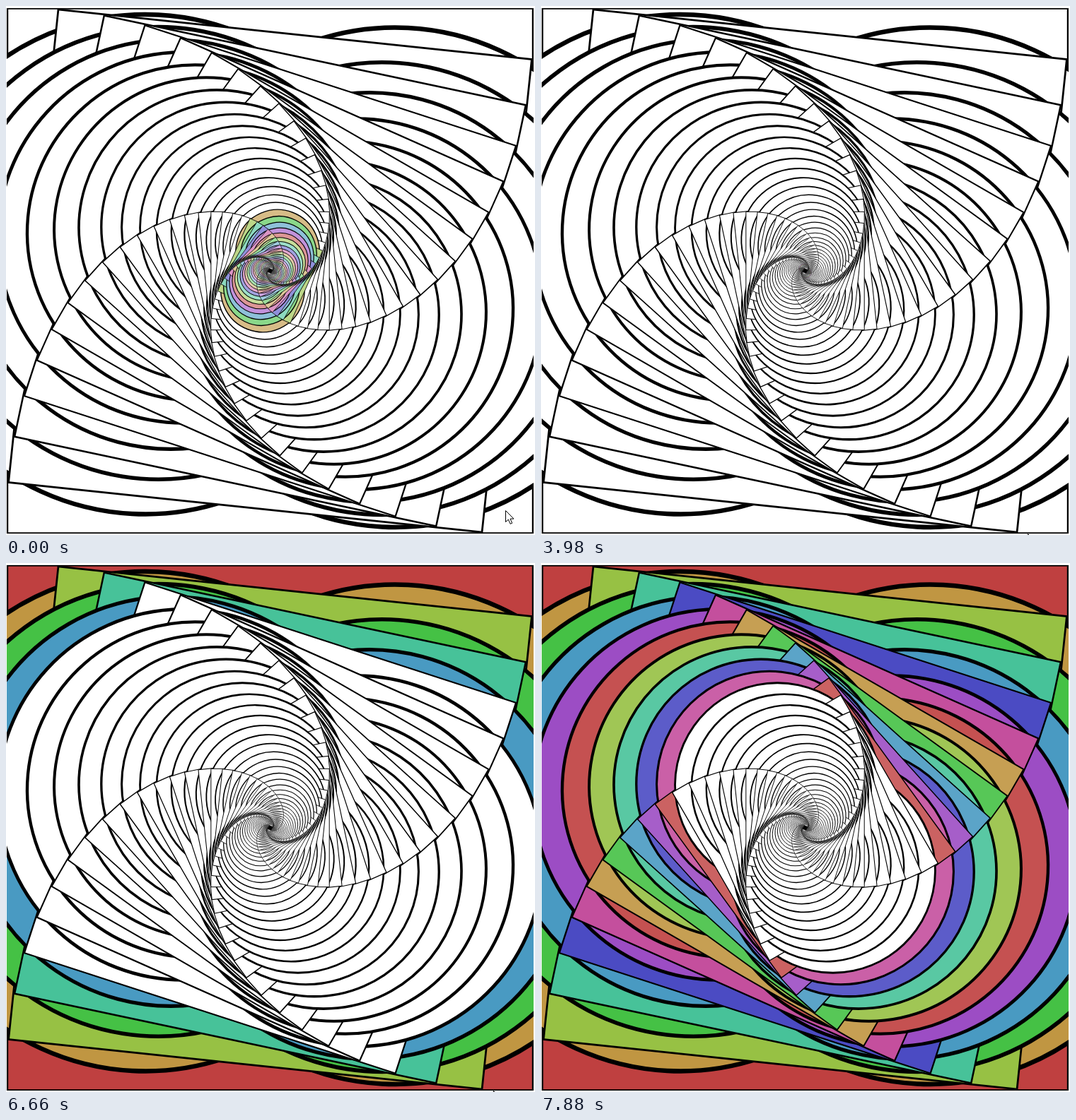
An HTML page with a canvas for the animation above (8000 ms loop, 748 by 749 pixels).

```html
<!DOCTYPE html>
<html lang="en">
<head>
<meta charset="utf-8">
<title>Spiral nest</title>
<style>
  html, body { margin: 0; width: 100%; height: 100%; overflow: hidden; background: #fff; }
  canvas { display: block; }
</style>
</head>
<body>
<canvas id="stage" width="748" height="749"></canvas>
<script>
const ctx = document.getElementById('stage').getContext('2d');
const LOOP = 8000, TICK = LOOP / 60;
const CX = 373.5, CY = 375, SIZE = 743.5;
const COUNT = 98;
const TURN = 3 * Math.PI / 180;
// Each figure fits the square around it after a turn.
const SHRINK = 1 / (Math.cos(TURN) + Math.sin(TURN));
const WIPE_START = -3473, WIPE_STEP = 95;
const PAINT_START = 6103, PAINT_STEP = 97;
const ARROW = new Path2D('M0 0V16L3.8 12.6 6.6 18.8 9.2 17.7 6.5 11.6H11.5Z');

const clamp = v => Math.max(0, Math.min(1, v));

function paint(path, fill, width) {
  ctx.fillStyle = fill;
  ctx.strokeStyle = '#000';
  ctx.lineWidth = width;
  ctx.fill(path);
  ctx.stroke(path);
}

// Even figures are squares, odd ones are pairs of overlapping circles.
function figure(i, fill) {
  const scale = SHRINK ** i, size = SIZE * scale;
  ctx.save();
  ctx.translate(CX, CY);
  ctx.rotate(TURN * i);
  if (i % 2) {
    for (const side of [-1, 1]) {
      const disc = new Path2D();
      disc.arc(side * size / 4, 0, size / 2, 0, 2 * Math.PI);
      paint(disc, fill, 6.2 * scale + 0.4);
    }
  } else {
    const box = new Path2D();
    box.rect(-size / 2, -size / 2, size, size);
    paint(box, fill, 2.6 * scale + 0.4);
  }
  ctx.restore();
}

// Colours are wiped from the outside in, then painted back the same way.
function fillOf(i, t) {
  const coloured = t >= PAINT_START
    ? i <= (t - PAINT_START) / PAINT_STEP
    : i > (t - WIPE_START) / WIPE_STEP;
  return coloured ? `hsl(${i * 40 % 360}, 50%, ${50 + i / 2}%)` : '#fff';
}

// The pointer drifts up, leaves at the bottom, later peeks in at the edge.
function pointer(t) {
  let x = 706, y = 714 - 9 * clamp(t / 900);
  if (t > 1100) y = 725;
  if (t > 1300) {
    if (t < 2700 || t > 7550) return;
    x = 686 + 3 * clamp((t - 2700) / 1800);
    y = 747;
  }
  ctx.save();
  ctx.translate(Math.round(x) + 0.5, Math.round(y) + 0.5);
  paint(ARROW, '#fff', 1);
  ctx.restore();
}

function draw(t) {
  ctx.fillStyle = '#fff';
  ctx.fillRect(0, 0, 748, 749);
  ctx.save();
  ctx.beginPath();
  ctx.rect(1, 3, 745, 744);
  ctx.clip();
  for (let i = 0; i < COUNT; i++) figure(i, fillOf(i, t));
  figure(COUNT, '#000');
  ctx.restore();
  pointer(t);
}

let last = -1;
function loop(now) {
  const step = Math.min(59, Math.floor((now % LOOP + 33) / TICK));
  if (step !== last) draw(step * TICK);
  last = step;
  requestAnimationFrame(loop);
}
loop(performance.now());
</script>
</body>
</html>
```
